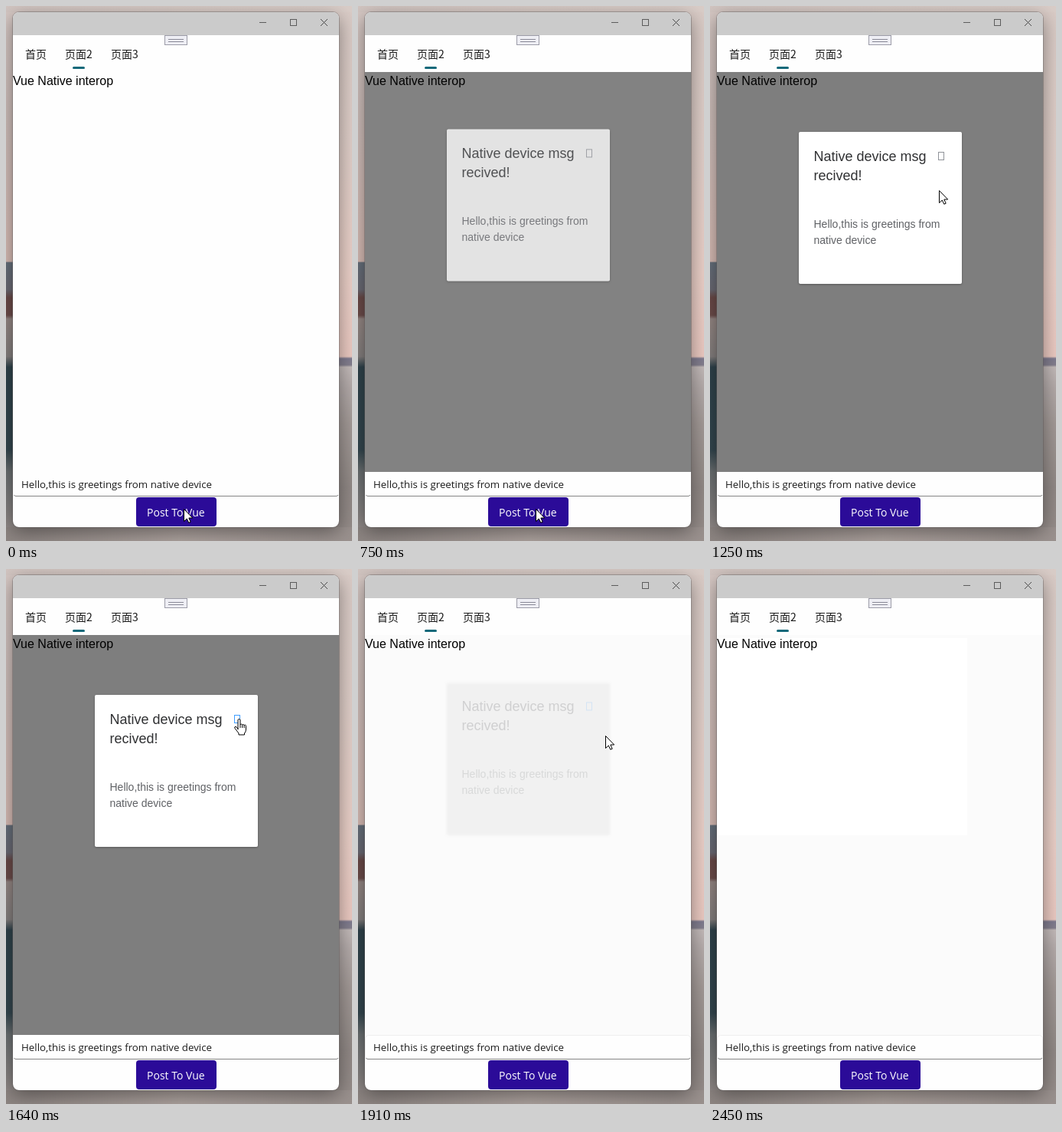
These frames come from a looping animation (452x697 px, 2700 ms). An HTML page with a canvas:

```html
<!DOCTYPE html>
<html lang="zh">
<head>
<meta charset="utf-8">
<title>Vue Native interop</title>
<style>
  html, body { margin: 0; width: 100%; height: 100%; overflow: hidden; }
  canvas { display: block; }
</style>
</head>
<body>
<canvas id="stage" width="452" height="697"></canvas>
<script>
const ctx = document.getElementById('stage').getContext('2d');
const LOOP = 2700;
const ARIAL = '"Liberation Sans", Arial, sans-serif';
const OPEN = '"Open Sans", "Noto Sans", sans-serif';
const CJK = '"Noto Sans CJK SC", "Noto Sans CJK JP", "Noto Sans CJK", sans-serif';

const steps = [
  [0, 'arrow', 232, 655, 0, 0],
  [750, 'arrow', 232, 655, 0.49, 0.82],
  [890, 'arrow', 232, 655, 0.5, 1],
  [1010, 'arrow', 254, 520, 0.5, 1],
  [1130, 'arrow', 285, 330, 0.5, 1],
  [1250, 'arrow', 299, 240, 0.5, 1],
  [1400, 'arrow', 301, 222, 0.5, 1],
  [1520, 'hand', 298, 196, 0.5, 1],
  [1640, 'hand', 298, 195, 0.5, 1],
  [1790, 'hand', 298, 195, 0.4, 0.9],
  [1910, 'arrow', 323, 217, 0.012, 0.17],
  [2060, 'arrow', 388, 330, 0.012, 0],
  [2180, 'arrow', 441, 560, 0.012, 0],
  [2300, 'resize', 422, 676, 0.012, 0],
  [2450, '', 0, 0, 0.012, 0]
];

const pointers = {
  arrow: new Path2D('M.5 .5V16.5L4.3 13L6.8 18.2L9.2 17.2L6.8 12H11.7Z'),
  hand: new Path2D('M5 14V2a1.5 1.5 0 0 1 3 0V8a1.4 1.4 0 0 1 2.7 .4a1.3 1.3 0 0 1 2.5 .5' +
    'a1.2 1.2 0 0 1 2.3 .6V14q0 3-2 5V21H6V19L1 12.5q-1-2 1-2.2q1 0 3 3Z'),
  resize: new Path2D('M1 1H7L5 3L13 11L15 9V15H9L11 13L3 5L1 7Z')
};

function rect(x, y, w, h, color) {
  ctx.fillStyle = color;
  ctx.fillRect(x, y, w, h);
}

function round(x, y, w, h, r) {
  ctx.beginPath();
  ctx.roundRect(x, y, w, h, r);
}

function text(str, x, y, size, family, color) {
  ctx.font = `${size}px ${family}`;
  ctx.fillStyle = color;
  ctx.fillText(str, x, y);
}

function line(color, ...pts) {
  ctx.strokeStyle = color;
  ctx.lineWidth = 1;
  ctx.beginPath();
  for (let i = 0; i < pts.length; i += 4) {
    ctx.moveTo(pts[i], pts[i + 1]);
    ctx.lineTo(pts[i + 2], pts[i + 3]);
  }
  ctx.stroke();
}

function blend(x, y, w, h, across, stops) {
  const g = across ? ctx.createLinearGradient(x, 0, x + w, 0)
                   : ctx.createLinearGradient(0, y, 0, y + h);
  for (const [at, color] of stops) g.addColorStop(at, color);
  rect(x, y, w, h, g);
}

function wallpaper() {
  blend(0, 0, 226, 697, false, [
    [0, '#d6c8c4'], [0.2, '#cfbfbb'], [0.477, '#d9bdb6'], [0.48, '#66707c'],
    [0.53, '#6b6a74'], [0.545, '#6b4a48'], [0.578, '#6d4d4b'], [0.585, '#968885'],
    [0.655, '#85807f'], [0.675, '#2f434c'], [0.83, '#34474f'], [0.87, '#6b7072'], [1, '#9a908d']
  ]);
  blend(226, 0, 226, 697, false, [
    [0, '#d9cbc6'], [0.25, '#e0cfc9'], [0.5, '#ebd0c8'], [0.655, '#eccac2'],
    [0.659, '#807c90'], [0.671, '#85808f'], [0.675, '#c4bbba'], [0.71, '#b5acab'],
    [0.78, '#a39a97'], [0.9, '#918986'], [1, '#968d8a']
  ]);
  blend(0, 679, 452, 18, true, [
    [0, '#8d8582'], [0.5, '#b0a5a1'], [1, '#9a918e']
  ]);
  blend(0, 0, 452, 8, true, [[0, '#d2c5c1'], [0.5, '#d8cbc6'], [1, '#dacdc8']]);
}

function frameWindow() {
  ctx.save();
  ctx.shadowColor = 'rgba(0,0,0,.42)';
  ctx.shadowBlur = 26;
  ctx.shadowOffsetY = 7;
  round(9, 8, 426, 671, 8);
  ctx.fillStyle = '#fefefe';
  ctx.fill();
  ctx.restore();
  round(8.5, 7.5, 427, 672, 8.5);
  ctx.strokeStyle = 'rgba(90,85,85,.4)';
  ctx.lineWidth = 1;
  ctx.stroke();
  round(9, 8, 426, 30, [8, 8, 0, 0]);
  ctx.fillStyle = '#cbcbcb';
  ctx.fill();

  line('#5c5c5c', 331, 21.5, 340, 21.5);
  ctx.strokeRect(371.5, 17.5, 8, 8);
  line('#4a4a4a', 411, 17, 420, 26, 420, 17, 411, 26);
}

function tabs() {
  rect(207, 38, 30, 13, '#9c9ca8');
  rect(208, 39, 28, 11, '#eeeef4');
  line('#8b8b98', 212, 43.5, 232, 43.5, 212, 46.5, 232, 46.5);
  text('首页', 25, 68, 14, CJK, '#1a1a1a');
  text('页面2', 77, 68, 14, CJK, '#1a1a1a');
  text('页面3', 137, 68, 14, CJK, '#1a1a1a');
  round(87, 79, 16, 3, 1.5);
  ctx.fillStyle = '#14697a';
  ctx.fill();
}

function footer(outlined) {
  rect(9, 607, 426, 32, '#fefefe');
  if (outlined) {
    round(9.5, 607.5, 425, 31, 4);
    ctx.strokeStyle = '#efefef';
    ctx.lineWidth = 1;
    ctx.stroke();
  }
  ctx.strokeStyle = '#858585';
  ctx.lineWidth = 1;
  ctx.beginPath();
  ctx.moveTo(10.5, 637);
  ctx.quadraticCurveTo(11, 638.5, 13, 638.5);
  ctx.lineTo(431, 638.5);
  ctx.quadraticCurveTo(433.5, 638.5, 434, 637);
  ctx.stroke();
  text('Hello,this is greetings from native device', 20, 628, 13.3, OPEN, '#1b1b1b');
  round(170, 640, 105, 38, 4);
  ctx.fillStyle = '#2b0b98';
  ctx.fill();
  text('Post To Vue', 184, 665, 14, OPEN, '#fff');
}

function dialog(opacity, hover) {
  ctx.save();
  ctx.globalAlpha = opacity;
  ctx.translate(0, -20 * (1 - opacity));
  ctx.save();
  ctx.shadowColor = 'rgba(0,0,0,.3)';
  ctx.shadowBlur = 3;
  ctx.shadowOffsetY = 1;
  round(116, 164, 213, 198, 2);
  ctx.fillStyle = '#fff';
  ctx.fill();
  ctx.restore();
  text('Native device msg', 135.5, 202, 18, ARIAL, '#303133');
  text('recived!', 135.5, 227, 18, ARIAL, '#303133');
  text('Hello,this is greetings from', 135.5, 289, 14, ARIAL, '#606266');
  text('native device', 135.5, 310, 14, ARIAL, '#606266');
  ctx.strokeStyle = hover ? '#409eff' : '#909399';
  ctx.lineWidth = 1;
  ctx.strokeRect(298.5, 190.5, 7, 10);
  ctx.restore();
}

function pointer(kind, x, y) {
  if (!kind) return;
  ctx.save();
  ctx.translate(x, y);
  ctx.fillStyle = '#fff';
  ctx.strokeStyle = '#000';
  ctx.lineWidth = 1;
  ctx.lineJoin = 'round';
  ctx.fill(pointers[kind]);
  ctx.stroke(pointers[kind]);
  if (kind === 'hand') {
    line('#000', 8, 8, 8, 12, 10.7, 8.5, 10.7, 12, 13.2, 9, 13.2, 12);
  }
  ctx.restore();
}

function draw(now) {
  const t = now % LOOP;
  const [, kind, x, y, shade, opacity] = steps.findLast(s => s[0] <= t);
  const closed = t >= 1910;
  wallpaper();
  frameWindow();
  tabs();
  text('Vue Native interop', 9, 103, 16, ARIAL, '#000');
  rect(9, 86, 426, 521, `rgba(0,0,0,${shade})`);
  if (t >= 2060) {
    rect(9, 90, 327, 257, '#fff');
    text('Vue Native interop', 9, 103, 16, ARIAL, '#000');
  }
  if (opacity) dialog(opacity, t >= 1520);
  footer(closed);
  pointer(kind, x, y);
}

const start = performance.now();
function tick() {
  draw(performance.now() - start);
  requestAnimationFrame(tick);
}
tick();
</script>
</body>
</html>
```
